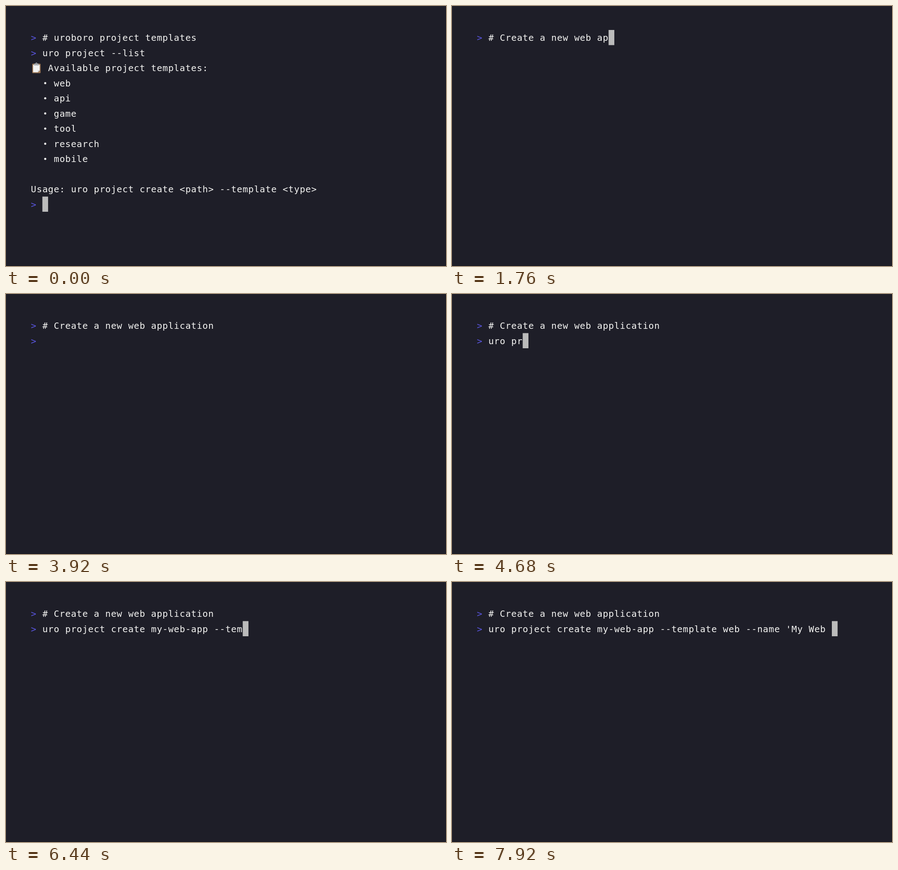
Animation of 973 by 575 pixels, one loop 8 s. Source, as an HTML page:

```html
<!DOCTYPE html>
<html lang="en">
<head>
<meta charset="utf-8">
<title>Terminal session</title>
<style>
  html, body { margin: 0; width: 100%; height: 100%; overflow: hidden; background: #1e1e28; }
  svg { display: block; width: 973px; height: 575px; }
  text {
    font: 19.8px "DejaVu Sans Mono", "Noto Sans Mono", monospace;
    letter-spacing: calc(12.66px - 0.602em);
    font-variant-ligatures: none;
    white-space: pre;
    fill: #f4f4f2;
  }
  .prompt { fill: #5a56e0; }
  .bullet { fill: #f4f4f2; }
</style>
</head>
<body>
<svg id="stage" viewBox="0 0 973 575" xmlns="http://www.w3.org/2000/svg">
  <rect width="973" height="575" fill="#1e1e28"/>
  <path d="M972.5 0V574.5H0" fill="none" stroke="#14141d"/>
  <g id="listing">
    <g id="clipboard">
      <rect x="58" y="127.5" width="18.5" height="21" rx="1.6" fill="#9b7655"/>
      <path d="M60 130H74.5V142.5L70.5 146.5H60Z" fill="#f3f3f3"/>
      <path d="M70.5 146.5V142.5H74.5Z" fill="#c9c9cc"/>
      <path d="M62 131.5V128.5Q62 127.5 63 127.5H65Q65 125 67.2 125T69.4 127.5H71.5Q72.5 127.5 72.5 128.5V131.5Z" fill="#aaaeb3"/>
      <circle cx="67.2" cy="127.2" r="1" fill="#62646a"/>
    </g>
  </g>
  <g id="session"></g>
  <rect id="cursor" width="12.66" height="33.5" fill="#bbbbbb"/>
</svg>
<script>
const CELL = 12.66, ROW = 33.5, LEFT = 55.1, TOP = 53, BASELINE = 24.2;
const LOOP = 8000, TICK = 40, BLINK = 600;
const NEW_PROMPT = 3320;

const colX = col => LEFT + col * CELL;
const rowY = row => TOP + row * ROW;
const byId = id => document.getElementById(id);

function add(parent, tag, attrs, content = '') {
  const node = document.createElementNS('http://www.w3.org/2000/svg', tag);
  for (const name in attrs) node.setAttribute(name, attrs[name]);
  node.textContent = content;
  return parent.appendChild(node);
}

function write(parent, row, col, content, cls = '') {
  return add(parent, 'text', { x: colX(col), y: rowY(row) + BASELINE, class: cls }, content);
}

function command(parent, row, content = '') {
  const prompt = write(parent, row, 0, '>', 'prompt');
  return { prompt, input: write(parent, row, 2, content) };
}

const listing = byId('listing'), session = byId('session'), cursor = byId('cursor');

command(listing, 0, '# uroboro project templates');
command(listing, 1, 'uro project --list');
write(listing, 2, 3, 'Available project templates:');
['web', 'api', 'game', 'tool', 'research', 'mobile'].forEach((name, i) => {
  add(listing, 'circle', { cx: colX(2.5), cy: rowY(3 + i) + 17.2, r: 2.4, class: 'bullet' });
  write(listing, 3 + i, 4, name);
});
write(listing, 10, 0, 'Usage: uro project create <path> --template <type>');
command(listing, 11);

// Typing rhythm: [characters typed, ticks since the first key]
const lines = [
  {
    text: '# Create a new web application',
    start: 560,
    rhythm: [[1, 0], [8, 10], [9, 12], [14, 20], [15, 21], [28, 40], [29, 42], [30, 43]]
  },
  {
    text: "uro project create my-web-app --template web --name 'My Web ",
    start: 4360,
    rhythm: [[1, 0], [6, 8], [7, 10], [14, 20], [15, 21], [19, 27], [20, 29], [28, 41],
      [29, 43], [35, 52], [36, 53], [42, 63], [43, 64], [56, 83], [57, 85], [60, 89]]
  }
];

function keyTime({ start, rhythm }, count) {
  const i = Math.max(1, rhythm.findIndex(([n]) => n >= count));
  const [n0, t0] = rhythm[i - 1], [n1, t1] = rhythm[i];
  return start + TICK * Math.round(t0 + (t1 - t0) * (count - n0) / (n1 - n0));
}

lines.forEach((line, row) => {
  line.keys = Array.from(line.text, (_, i) => keyTime(line, i + 1));
  Object.assign(line, command(session, row));
});

function placeCursor(row, col, visible) {
  cursor.setAttribute('x', colX(col));
  cursor.setAttribute('y', rowY(row));
  cursor.style.display = visible ? '' : 'none';
}

function draw(t) {
  const cleared = t >= lines[0].start;
  listing.style.display = cleared ? 'none' : '';
  session.style.display = cleared ? '' : 'none';

  const typed = lines.map(line => line.keys.filter(key => key <= t).length);
  lines.forEach((line, i) => { line.input.textContent = line.text.slice(0, typed[i]); });
  lines[1].prompt.style.display = t >= NEW_PROMPT ? '' : 'none';

  if (!cleared) return placeCursor(11, 2, true);
  const row = t >= NEW_PROMPT ? 1 : 0;
  const count = typed[row];
  const lastAction = count ? lines[row].keys[count - 1] : NEW_PROMPT;
  placeCursor(row, 2 + count, t - lastAction < BLINK);
}

const origin = performance.now();
function frame() {
  draw((performance.now() - origin) % LOOP);
  requestAnimationFrame(frame);
}
draw(0);
requestAnimationFrame(frame);
</script>
</body>
</html>
```
